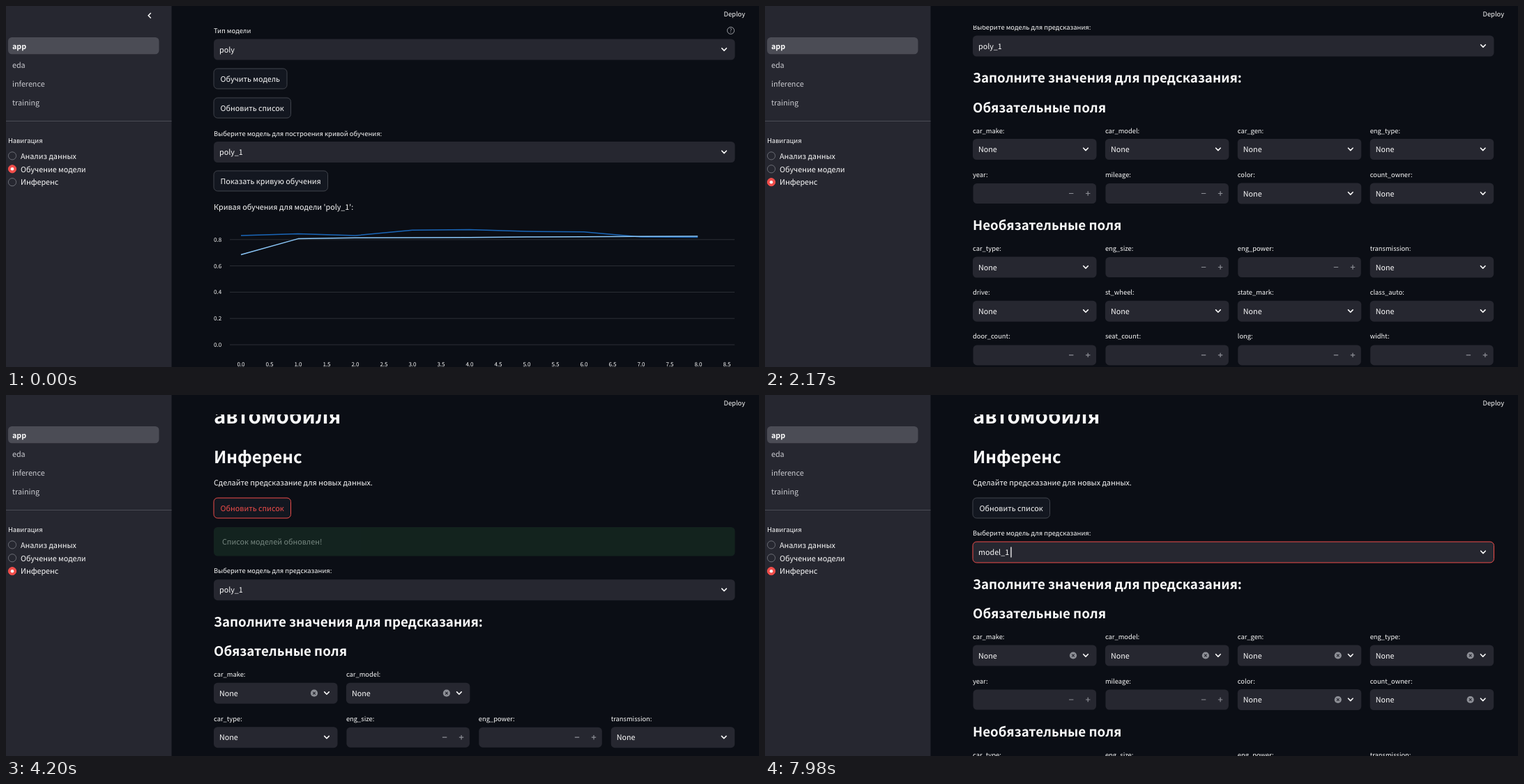
An HTML page that plays this animation: 1080 by 519 pixels, repeating every 8000 ms.

```html
<!DOCTYPE html>
<html lang="ru">
<head>
<meta charset="utf-8">
<title>Model dashboard</title>
<style>
  html, body { margin: 0; width: 100%; height: 100%; overflow: hidden; background: #0b0e15; }
  svg { display: block; width: 100%; height: 100%; }
  text {
    font-family: "Noto Sans CJK JP", "Noto Sans CJK SC", "Noto Sans CJK", "Noto Sans", sans-serif;
    font-size: 10.75px; fill: #fafafa; white-space: pre; text-rendering: geometricPrecision;
  }
  .small { font-size: 9.35px; }
  .tick { font-size: 8.1px; }
  .h1 { font-size: 29.4px; font-weight: 700; }
  .h2 { font-size: 24px; font-weight: 600; }
  .h3 { font-size: 18.7px; font-weight: 600; }
  .strong { font-weight: 600; }
</style>
</head>
<body>
<svg id="stage" viewBox="0 0 1080 519" preserveAspectRatio="none">
  <defs><clipPath id="page"><rect x="238" y="28" width="842" height="491"/></clipPath></defs>
</svg>
<script>
const BG = '#0b0e15', PANEL = '#262730', RED = '#f04d4a', EDGE = '#41444c', WHITE = '#fafafa', GREY = '#8d8f96';
const FRAME = 70, LOOP = 8000;
const stage = document.getElementById('stage');

function el(parent, tag, attrs = {}) {
  const node = document.createElementNS('http://www.w3.org/2000/svg', tag);
  for (const k in attrs) node.setAttribute(k, attrs[k]);
  parent.append(node);
  return node;
}
const group = (p, attrs) => el(p, 'g', attrs);
const rect = (p, x, y, width, height, rx, fill, more) => el(p, 'rect', { x, y, width, height, rx, fill, ...more });
const line = (p, d, stroke, width = 1, more) =>
  el(p, 'path', { d, stroke, fill: 'none', 'stroke-width': width, ...more });
function text(p, x, y, str, cls = '', more) {
  const node = el(p, 'text', { x, y, class: cls, ...more });
  node.textContent = str;
  return node;
}
const show = (node, on) => node.setAttribute('display', on ? 'inline' : 'none');
const fade = (node, v) => { show(node, v > 0); node.setAttribute('opacity', v); };
const moveY = (node, y) => node.setAttribute('transform', `translate(0 ${y})`);

// widgets
function button(p, y, width, label) {
  const box = rect(p, 298, y + .5, width, 29, 5.5, '#131720', { stroke: EDGE });
  return { box, label: text(p, 307.5, y + 19, label) };
}
function select(p, x, y, width, value) {
  const box = rect(p, x, y, width, 30, 5.5, PANEL);
  const cx = x + width - 15.5;
  line(p, `M${cx - 3.3} ${y + 13.2}l3.3 3.4l3.3-3.4`, WHITE, 1.6, { 'stroke-linecap': 'round', 'stroke-linejoin': 'round' });
  return { box, label: text(p, x + 8, y + 19, value) };
}
function number(p, x, y) {
  rect(p, x + .5, y + .5, 176.5, 29, 5.5, PANEL);
  line(p, `M${x + 138} ${y + 15}h6.4M${x + 162} ${y + 15}h6.4m-3.2-3.2v6.4`, GREY, 1.2);
}
function clearIcon(p, x, y) {
  const g = group(p);
  el(g, 'circle', { cx: x, cy: y, r: 5.1, fill: GREY });
  line(g, `M${x - 1.8} ${y - 1.8}l3.6 3.6m0-3.6l-3.6 3.6`, PANEL, 1.1);
  return g;
}
function linkIcon(p, x, y) {
  return line(p, `M${x + 5.5} ${y - 3}H${x + 3.5}a3 3 0 0 0 0 6h2M${x + 8} ${y - 3}h2a3 3 0 0 1 0 6h-2M${x + 4.3} ${y}h5`,
    GREY, 1.3);
}

// page content, placed as it stands after the last scroll
const page = group(stage, { 'clip-path': 'url(#page)' });
const train = group(page), chart = group(page), infer = group(page);

text(train, 298, 39, 'Тип модели', 'small');
el(train, 'circle', { cx: 1039.5, cy: 35.3, r: 5, fill: 'none', stroke: '#a0a2a8' });
text(train, 1039.5, 38.2, '?', 'tick', { 'text-anchor': 'middle', style: 'fill:#a0a2a8' });
select(train, 298, 47.5, 747.5, 'poly');
button(train, 89.5, 105, 'Обучить модель');
button(train, 131.5, 110.5, 'Обновить список');
text(train, 298, 186.5, 'Выберите модель для построения кривой обучения:', 'small');
select(train, 298, 195, 747.5, 'poly_1');
button(train, 236.5, 163.5, 'Показать кривую обучения');

text(chart, 298, 293, "Кривая обучения для модели 'poly_1':");
for (let i = 0; i < 5; i++) {
  const y = 487 - i * 37.8;
  line(chart, `M321 ${y}H1045`, '#2c2f36');
  text(chart, 298, y + 3, (i * .2).toFixed(1), 'tick');
}
for (let i = 0; i < 18; i++)
  text(chart, 337 + i * 41, 518, (i / 2).toFixed(1), 'tick', { 'text-anchor': 'middle' });
const curve = (ys, color) =>
  line(chart, 'M' + ys.map((y, i) => `${337 + i * 81.9} ${y}`).join('L'), color, 1.5, { 'stroke-linejoin': 'round' });
curve([330, 327.5, 330, 322.3, 321.6, 324, 324.8, 332, 332.4], '#1a66b8');
curve([357.5, 334.6, 333.2, 333.1, 332.8, 332.1, 331.7, 331.3, 331], '#8cc8fa');

text(infer, 298, 41, 'автомобиля', 'h1');
text(infer, 298, 97.5, 'Инференс', 'h2');
text(infer, 298, 130, 'Сделайте предсказание для новых данных.');
const refresh = button(infer, 147.5, 110.5, 'Обновить список');
const note = group(infer);
rect(note, 298, 190, 747.5, 41.5, 5.5, '#1c3829');
text(note, 310, 215, 'Список моделей обновлен!', '', { style: 'fill:#dffde9' });

const body = group(infer);
text(body, 298, 202, 'Выберите модель для предсказания:', 'small');
const model = select(body, 298, 211, 747.5, 'poly_1');
const caret = rect(body, 342, 218.5, 1.3, 15, 0, WHITE);
text(body, 298, 278.5, 'Заполните значения для предсказания:', 'h3');
text(body, 298, 321, 'Обязательные поля', 'h3');

const clears = [];
function row(p, y, names, kinds, clearable) {
  return names.split(' ').map((name, i) => {
    const x = 298 + i * 189.9, g = group(p);
    text(g, x, y, name + ':', 'small');
    if (kinds[i] === 'n') number(g, x, y + 8.5);
    else {
      select(g, x, y + 8.5, 177.5, 'None');
      if (clearable) clears.push(clearIcon(g, x + 144, y + 23.5));
    }
    return g;
  });
}
const first = row(body, 351, 'car_make car_model car_gen eng_type', 'ssss', true);
const second = group(body);
row(second, 414.5, 'year mileage color count_owner', 'nnss', true);
text(second, 298, 490.5, 'Необязательные поля', 'h3');
const third = group(body), rest = group(body);
row(third, 520.5, 'car_type eng_size eng_power transmission', 'snns');
[['drive st_wheel state_mark class_auto', 'ssss'], ['door_count seat_count long widht', 'nnnn'],
 ['height clearance v_bag v_tank', 'nnnn'], ['curb_weight front_brakes rear_brakes max_speed', 'nssn']]
  .forEach(([names, kinds], i) => row(rest, 583.7 + i * 63.2, names, kinds));
const links = [linkIcon(body, 511, 485.5), linkIcon(body, 489, 316)];

const menu = group(body);
rect(menu, 298, 242, 747.5, 60, 5.5, BG, { style: 'filter:drop-shadow(0 3px 5px #0006)' });
line(menu, 'M298 271.5H1045.5V296a5.5 5.5 0 0 1-5.5 5.5H303.5a5.5 5.5 0 0 1-5.5-5.5Z', 'none', 0, { style: 'fill:' + PANEL });
text(menu, 310, 260.5, 'model_1');
text(menu, 310, 290.5, 'poly_1');

// sidebar
rect(stage, 0, 0, 237.5, 519, 0, PANEL);
const collapse = line(stage, 'M207.8 10l-3.6 3.8l3.6 3.8', WHITE, 1.5);
rect(stage, 3, 45, 216.5, 24.3, 5.5, '#4b4c55');
['app', 'eda', 'inference', 'training'].forEach((s, i) =>
  text(stage, 9, 61.7 + i * 27.1, s, i ? '' : 'strong', { style: 'fill:' + (i ? '#c9cacf' : WHITE) }));
line(stage, 'M0 165.5H237.5', '#4a4c55');
text(stage, 3, 196.8, 'Навигация', 'small');
const radios = ['Анализ данных', 'Обучение модели', 'Инференс'].map((s, i) => {
  const cy = 215.4 + i * 18.9;
  text(stage, 21, cy + 4.2, s);
  return {
    ring: el(stage, 'circle', { cx: 9, cy, r: 5.6 }),
    dot: el(stage, 'circle', { cx: 9, cy, r: 2.3, fill: WHITE })
  };
});

// top bar
text(stage, 1029.5, 14.5, 'Deploy', 'small');
const running = group(stage);
text(running, 924, 14.5, 'RUNNING...', 'small', { style: 'fill:#9a9ca2' });
text(running, 989.5, 14.5, 'Stop', 'small');
const poses = ['M903 4.5l4.5-.8l3 5l-6.5 2.6', 'M902.5 8l5-3.5l4 5l-7 1.5'].map(d => {
  const g = group(running);
  line(g, d, GREY, 1.8, { 'stroke-linejoin': 'round' });
  el(g, 'circle', { cx: 913.8, cy: 8, r: 2, fill: GREY });
  for (const y of [13.3, 16.8])
    line(g, `M901 ${y}q2-1.6 4 0t4 0t4 0t4 0`, GREY, 1.5);
  return g;
});

// vertical offset of the inference page
function scroll(t) {
  if (t < 2030) return -258;
  if (t < 2170) return t < 2100 ? -240 : -207;
  return -168.5 * (1 - Math.min(1, (t - 2170) / 910)) ** 1.25;
}
const between = (t, a, b) => t >= a && t < b;
const ramp = (t, a, b) => Math.max(0, Math.min(1, (t - a) / (b - a)));
const mix = (a, b, k) => `color-mix(in srgb, ${b} ${k * 100}%, ${a})`;

function draw(t) {
  const infering = t >= 700;
  show(train, !infering);
  show(infer, infering);
  fade(chart, t >= 1190 ? 0 : 1 - .6 * ramp(t, 910, 1120));
  moveY(chart, infering ? 34 : 0);
  moveY(infer, scroll(t));
  show(collapse, t < 1190);

  const active = t < 560 ? 1 : 2;
  radios.forEach(({ ring, dot }, i) => {
    const on = i === active, pressed = i === 2 && t >= 140;
    ring.setAttribute('fill', on ? RED : pressed ? '#353741' : PANEL);
    ring.setAttribute('stroke', on ? RED : '#6b6d75');
    show(dot, on);
  });

  show(running, between(t, 630, 1540) || between(t, 4690, 5040));
  const pose = between(t, 1400, 4690) || t >= 4900 ? 1 : 0;
  poses.forEach((g, i) => show(g, i === pose));

  // refresh button: hover, press, release
  const hot = t < 3640 ? 0 : 1 - ramp(t, 4200, 4480);
  const press = t === 3920 ? .6 : t === 3990 ? 1 : 0;
  refresh.box.style.stroke = mix(EDGE, RED, hot);
  refresh.box.style.fill = mix('#131720', RED, press);
  refresh.label.style.fill = press ? WHITE : mix(WHITE, RED, hot);

  // form rebuilt while the script reruns
  const noted = between(t, 4200, 7560), partial = between(t, 4200, 4340);
  fade(note, noted ? .5 + .5 * ramp(t, 4200, 4410) : 0);
  moveY(body, noted ? 54.2 : 0);
  first.forEach((g, i) => show(g, !partial || i < 2 || t >= 4270));
  show(second, !partial);
  moveY(third, partial ? -106 : 0);
  show(rest, t >= 1190 && !partial);
  clears.forEach(g => show(g, t >= 4200));
  show(links[0], between(t, 1680, 1820));
  show(links[1], between(t, 7700, 7980));

  // model picker
  const picked = t >= 7420;
  model.label.textContent = picked ? 'model_1' : 'poly_1';
  model.box.setAttribute('stroke', t >= 5530 ? RED : 'none');
  show(caret, between(t, 5530, 6090) || between(t, 6580, 7280) || picked);
  caret.setAttribute('x', picked ? 352.3 : 341.8);
  fade(menu, picked ? 0 : ramp(t, 5530, 5740));
}

const start = performance.now();
let last = -1;
function tick() {
  const now = (performance.now() - start) % LOOP;
  const t = Math.floor(now / FRAME) * FRAME;
  if (t !== last) draw(last = t);
  requestAnimationFrame(tick);
}
tick();
</script>
</body>
</html>
```
